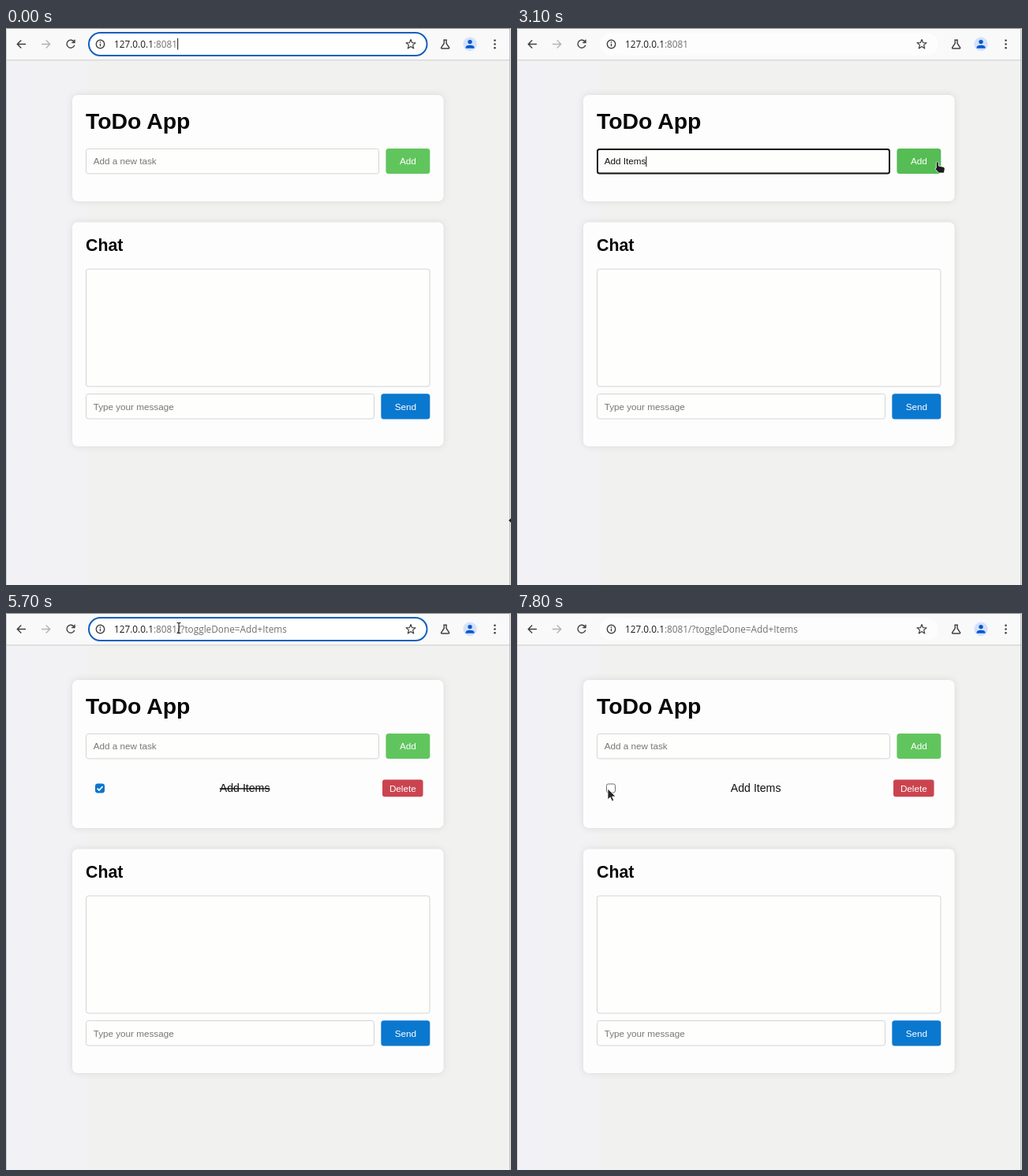
These frames come from a looping animation (640 by 707 pixels, 8 s). An HTML page:

```html
<!DOCTYPE html>
<html lang="en">
<head>
<meta charset="utf-8">
<title>ToDo App</title>
<style>
  html, body { margin: 0; width: 100%; height: 100%; overflow: hidden; background: #f1f1ef; }
  svg { display: block; width: 100vw; height: 100vh; }
  text { font: 11.7px "Liberation Sans", Arial, sans-serif; fill: #111; white-space: pre; }
  .h1 { font-size: 28.4px; font-weight: bold; fill: #080808; }
  .h2 { font-size: 21.3px; font-weight: bold; fill: #080808; }
  .item { font-size: 14.15px; }
  .hint { fill: #777; }
  .label { fill: #fff; text-anchor: middle; }
  .url { font: 11.8px "Open Sans", "Noto Sans", sans-serif; fill: #707070; }
  .host { fill: #1c1c1c; }
  .card { fill: #fefdfd; filter: drop-shadow(0 0 4.4px rgba(0,0,0,.1)); }
  .field { fill: #fefefd; stroke: #d4d4d4; stroke-width: 1; }
  .icon { fill: none; stroke: #404040; stroke-width: 1.4; }
  .caret { fill: #111; }
</style>
</head>
<body>
<svg viewBox="0 0 640 707" preserveAspectRatio="none">
  <defs>
    <linearGradient id="bg">
      <stop offset="0" stop-color="#f2f1f5"/>
      <stop offset=".16" stop-color="#f2f1f3"/>
      <stop offset=".175" stop-color="#f1f1ef"/>
    </linearGradient>
  </defs>
  <rect width="640" height="707" fill="url(#bg)"/>

  <!-- browser toolbar -->
  <rect width="640" height="41" fill="#f9f9f9"/>
  <rect width="640" height="1" fill="#8c8c8c"/>
  <rect y="40.3" width="640" height="1" fill="#cbcaca"/>
  <rect id="pill" x="105" y="6" width="428.5" height="29" rx="14.5"/>
  <g class="icon">
    <path d="M25 20.5H14.5M19.3 15.5l-5 5 5 5"/>
    <path d="M45 20.5h10.500M50.700 15.500l5 5-5 5" stroke="#b4b4b4"/>
    <path d="M86.300 17.600A5 5 0 1 0 86.800 21.700M87 14.800v3.700h-3.800"/>
    <circle cx="119.500" cy="20.500" r="5.200"/>
    <path d="M119.500 19.800v3.400M119.500 17.300v1.400"/>
    <path d="M554.300 15.200h4.600M555.200 15.200v4.300l-3.600 5.300q-.5 1.200.8 1.200h8.400q1.300 0 .8-1.200l-3.600-5.300v-4.300"/>
    <path id="star" stroke-width="1.200" stroke-linejoin="round"/>
  </g>
  <circle cx="588" cy="20.300" r="8.700" fill="#d3e2fb"/>
  <circle cx="588" cy="17.600" r="2.700" fill="#0b57d0"/>
  <path d="M582.500 25.800v-1q0-3 5.500-3t5.500 3v1z" fill="#0b57d0"/>
  <g fill="#404040">
    <circle cx="619.500" cy="15.700" r="1.300"/>
    <circle cx="619.500" cy="20.500" r="1.300"/>
    <circle cx="619.500" cy="25.300" r="1.300"/>
  </g>
  <rect id="mark" x="217" y="12.500" height="16" fill="#a8c7fa"/>
  <text class="url" x="137" y="24.500"><tspan class="host">127.0.0.1</tspan>:8081<tspan id="query"></tspan></text>
  <rect id="urlCaret" class="caret" x="217.200" y="13" width="1" height="14.500"/>

  <!-- task card -->
  <rect id="card" class="card" x="84" y="85" width="470.500" rx="7"/>
  <text class="h1" x="101" y="128">ToDo App</text>
  <rect id="task" class="field" x="101.500" y="153.400" width="371" height="31.500" rx="3"/>
  <rect id="ring" x="102" y="154" width="370" height="30.500" rx="2.500" fill="none" stroke="#121212" stroke-width="2"/>
  <text id="typed" x="110.700" y="173.200"></text>
  <rect id="caret" class="caret" y="163" width="1" height="13"/>
  <rect id="add" x="481.400" y="153" width="55.900" height="32" rx="3.500"/>
  <text class="label" x="509.400" y="173.200">Add</text>
  <g id="row">
    <rect id="box" x="113.500" y="217" width="11" height="11" rx="2.200"/>
    <path id="tick" d="M115.600 222.700l2.400 2.400 4.500-5" fill="none" stroke="#fff" stroke-width="1.700"/>
    <text id="name" class="item" x="270.800" y="227.300">Add Items</text>
    <rect x="477" y="211.500" width="51.500" height="21.800" rx="3" fill="#ca444f"/>
    <text class="label" x="502.800" y="226.600">Delete</text>
  </g>

  <!-- chat card -->
  <g id="chat">
    <rect class="card" x="84" y="246.500" width="470.500" height="284.500" rx="7"/>
    <text class="h2" x="101" y="283">Chat</text>
    <rect class="field" x="101.500" y="306" width="435.500" height="149" rx="3"/>
    <rect class="field" x="101.500" y="464.500" width="365" height="31.500" rx="3"/>
    <text class="hint" x="110.700" y="484.500">Type your message</text>
    <rect x="475.300" y="464.200" width="62" height="32.200" rx="3.500" fill="#0a78cf"/>
    <text class="label" x="506.300" y="484.500">Send</text>
  </g>

  <rect width="1" height="707" fill="#cfcfd2"/>
  <rect x="638.300" width="1" height="707" fill="#a2a2a2"/>
  <rect x="639.300" width=".7" height="707" fill="#e4e4e4"/>

  <!-- pointer shapes, hot spot at 0,0 -->
  <g id="pointer">
    <path id="arrow" d="M0 0V13.800L3.200 10.900 5.400 15.800 7.700 14.800 5.600 10H10z" fill="#262626" stroke="#fff" stroke-width=".8"/>
    <path id="beam" d="M-2.500-6.500h1.700L0-5.800.8-6.500h1.700M0-5.800V5.800M-2.500 6.500h1.700L0 5.800.8 6.500h1.700" fill="none" stroke="#222" stroke-width="1.200"/>
    <path id="hand" d="M-1.700.8Q-.2-1.300 1.300.8V5l6 1.300q2 .6 1.900 2.600L8.300 14H1.400L-2.600 9.400q-.8-1.600.9-1.700z" fill="#1c1c1c" stroke="#fff" stroke-width=".8"/>
    <path id="resize" d="M0 0L4-3.500v7z" fill="#1c1c1c"/>
  </g>
</svg>
<script>
const LOOP = 8000, STEP = 100;
const $ = id => document.getElementById(id);
const set = (id, attrs) => { for (const k in attrs) $(id).setAttribute(k, attrs[k]); };
const show = (id, on) => set(id, { visibility: on ? 'visible' : 'hidden' });
const within = (t, a, b) => t >= a && t < b;

// time, x, y of the pointer
const path = [
  [100, 637, 625], [900, 400, 168], [2800, 400, 168], [3100, 533, 170],
  [3600, 533, 170], [4200, 130, 224], [4600, 130, 224], [4800, 116, 223],
  [5100, 116, 223], [5500, 219, 19], [5700, 219, 19], [6000, 536, 34],
  [6700, 536, 34], [7000, 185, 190], [7100, 185, 190], [7500, 115, 223]
];
const keys = [[1300, 'A'], [1400, 'd'], [1500, 'd'], [1700, ' '],
  [2000, 'I'], [2100, 't'], [2300, 'e'], [2400, 'm'], [2600, 's']];

const starPoints = Array.from({ length: 10 }, (_, i) => {
  const r = i % 2 ? 2.7 : 6.3, a = i * Math.PI / 5;
  return (513 + r * Math.sin(a)).toFixed(2) + ' ' + (20.8 - r * Math.cos(a)).toFixed(2);
});
set('star', { d: 'M' + starPoints.join('L') + 'z' });

function pointerAt(t) {
  const i = path.findIndex(p => p[0] > t);
  if (i === 0) return path[0].slice(1);
  if (i < 0) return path[path.length - 1].slice(1);
  const [t0, x0, y0] = path[i - 1], [t1, x1, y1] = path[i];
  const u = (t - t0) / (t1 - t0), e = u * u * (3 - 2 * u);
  return [x0 + (x1 - x0) * e, y0 + (y1 - y0) * e];
}

function draw(t) {
  const listed = t >= 3300, dy = listed ? 53 : 0;
  const done = within(t, 4800, 7700);
  const urlFocus = t < 1000 || within(t, 5600, 6200);
  const taskFocus = within(t, 1000, 3300);
  const [x, y] = pointerAt(t);
  const over = (l, top, r, b) => x >= l && x <= r && y >= top && y <= b;

  set('pill', urlFocus
    ? { fill: '#fff', stroke: '#1260bd', 'stroke-width': 2 }
    : { fill: '#fdfdfd', stroke: 'none' });
  $('query').textContent =
    within(t, 3300, 4800) ? '/?newTodo=Add+Items' :
    within(t, 4800, 6000) || t >= 7700 ? '/?toggleDone=Add+Items' : '';
  show('urlCaret', t < 1000 || within(t, 6000, 6200));
  const dragging = within(t, 5800, 6000);
  show('mark', dragging);
  if (dragging) set('mark', { width: Math.max(0, Math.min(x - 217, $('query').getComputedTextLength())) });

  const text = keys.filter(k => k[0] <= t).map(k => k[1]).join('').replace(' ', '\u00a0');
  const hint = t >= 3300 || (!text);
  $('typed').textContent = hint ? 'Add a new task' : text;
  set('typed', { class: hint ? 'hint' : '' });
  show('ring', taskFocus);
  show('caret', taskFocus);
  set('caret', { x: hint ? 110.7 : 110.7 + $('typed').getComputedTextLength() });

  const onAdd = over(481, 153, 537, 185);
  set('add', { fill: onAdd ? '#56bc54' : '#61c55e' });
  set('card', { height: 135 + dy });
  set('chat', { transform: `translate(0 ${dy})` });
  show('row', listed);
  show('tick', listed && done);
  set('box', done ? { fill: '#0a75d0', stroke: '#0a75d0' } : { fill: '#fff', stroke: '#707070' });
  set('name', { 'text-decoration': done ? 'line-through' : 'none' });

  const onField = over(101, 153, 473, 185) || over(105, 5, 534, 33) ||
    over(101, 464 + dy, 467, 496 + dy);
  const shape = x > 636 ? 'resize' : onField || dragging ? 'beam' : onAdd ? 'hand' : 'arrow';
  for (const id of ['arrow', 'beam', 'hand', 'resize']) show(id, id === shape);
  set('pointer', { transform: `translate(${x.toFixed(1)} ${y.toFixed(1)})` });
}

const start = performance.now();
function tick() {
  const t = (performance.now() - start) % LOOP;
  draw(Math.floor(t / STEP) * STEP);
  requestAnimationFrame(tick);
}
tick();
</script>
</body>
</html>
```
